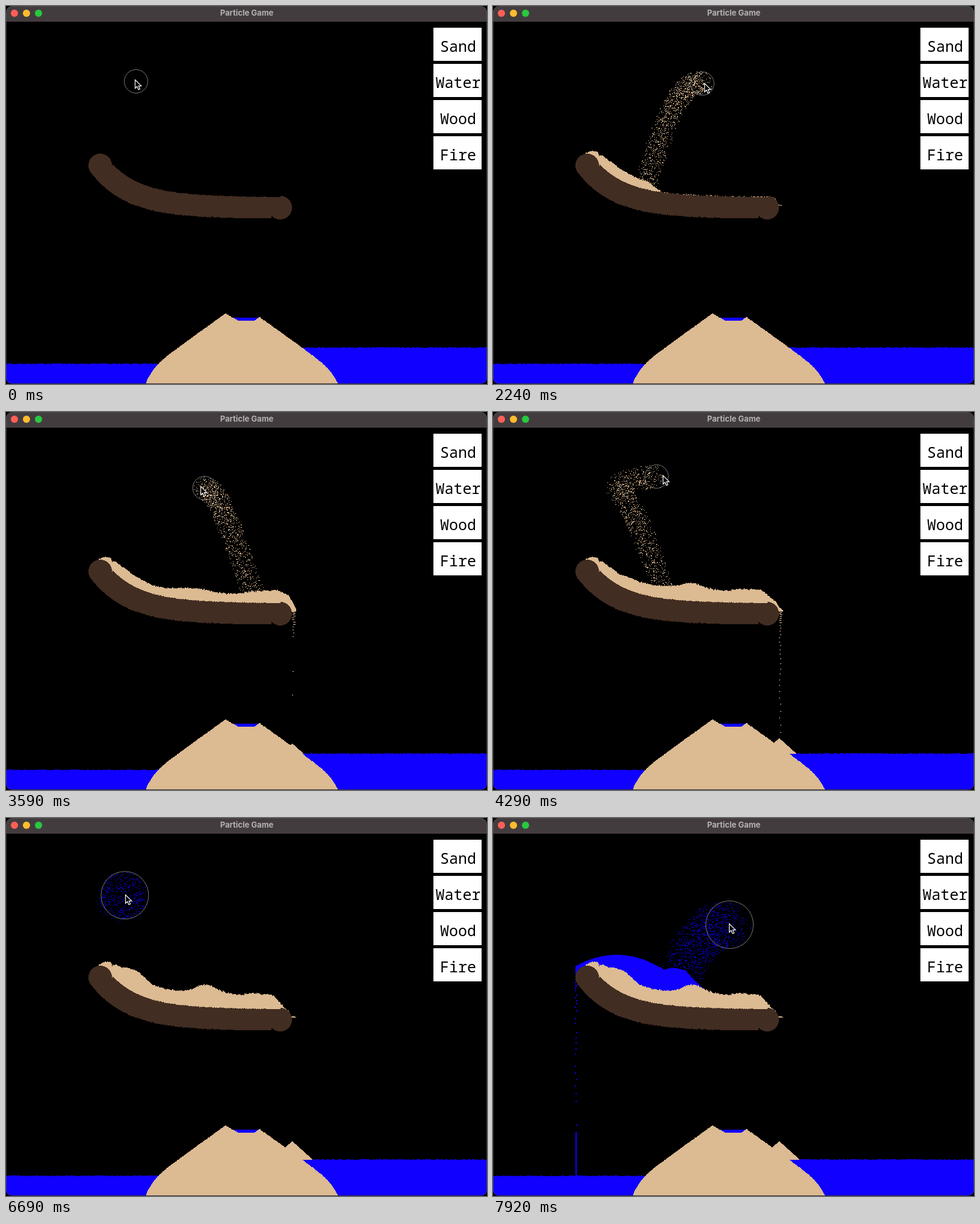
Recreate the animation shown at these times as an HTML page with a canvas. Size 799x627 px, loop 8 s.

```html
<!DOCTYPE html>
<html lang="en">
<head>
<meta charset="utf-8">
<title>Particle Game</title>
<style>
  html, body { margin: 0; width: 100%; height: 100%; overflow: hidden; background: #000; }
  svg, canvas { position: absolute; left: 0; top: 0; width: 799px; height: 627px; display: block; border-radius: 10px; }
  .title { font: 700 13px Inter, sans-serif; fill: #b5b1b3; text-anchor: middle; }
  .label { font: 25px "Noto Sans Mono", monospace; text-anchor: middle; }
</style>
</head>
<body>
<svg id="ui" viewBox="0 0 799 627">
  <rect width="799" height="26" fill="#433c3f"/>
  <circle cx="14" cy="12" r="6" fill="#ff5f57"/>
  <circle cx="34" cy="12" r="6" fill="#febc2e"/>
  <circle cx="54" cy="12" r="6" fill="#28c840"/>
  <text class="title" x="400" y="16">Particle Game</text>
</svg>
<canvas id="stage" width="799" height="627"></canvas>
<svg viewBox="0 0 799 627">
  <rect x=".5" y=".5" width="798" height="626" rx="10" fill="none" stroke="#555" stroke-opacity=".6"/>
</svg>
<script>
const SAND = '#dcba92', WATER = '#1000ff', WOOD = '#422d22';
const LOOP = 8000, FRAME = LOOP / 90;
const PHASE = 30;    // each picture shows the scene this far into its frame
const GRAVITY = 750; // half the acceleration, px/s²
const TICK = 16;
const ctx = document.getElementById('stage').getContext('2d');

['Sand', 'Water', 'Wood', 'Fire'].forEach((name, i) => {
  document.getElementById('ui').insertAdjacentHTML('beforeend',
    `<rect x="710" y="${36 + 60 * i}" width="80" height="55" fill="#fff"/>
     <text class="label" x="751" y="${76 + 60 * i}">${name}</text>`);
});

// Turning points of the brush: time, x, y
const brushPath = [
  [30, 216, 125], [980, 168, 75], [1300, 180, 90], [1520, 215, 88], [2420, 378, 138], [2870, 462, 153],
  [3320, 369, 134], [3590, 329, 126], [4150, 205, 107], [4600, 410, 107], [5060, 742, 135],
  [5190, 671, 140], [5210, 363, 175], [6500, 188, 121], [6690, 197, 128], [7200, 226, 140], [7940, 393, 177]
];

const sat = v => Math.min(1, Math.max(0, v));
const clamp = (v, lo, hi) => Math.min(hi, Math.max(lo, v));
const mix = (a, b, k) => a + (b - a) * k;
const arc = (x, cx, r) => Math.sqrt(Math.max(0, r * r - (x - cx) ** 2));
const bump = (x, cx, width) => Math.exp(-(((x - cx) / width) ** 2));

function rand(a, b = 0) {
  let h = Math.imul(a + 1, 0x9e3779b1) ^ Math.imul(b + 7, 0x85ebca6b);
  h = Math.imul(h ^ (h >>> 15), 0x2c1b3c6d);
  h = Math.imul(h ^ (h >>> 12), 0x297a2d39);
  return ((h ^ (h >>> 15)) >>> 0) / 4294967296;
}

function along(path, t, col) {
  if (t <= path[0][0]) return path[0][col];
  const i = path.findIndex(p => p[0] >= t);
  if (i < 0) return path[path.length - 1][col];
  const a = path[i - 1], b = path[i];
  return mix(a[col], b[col], (t - a[0]) / (b[0] - a[0]));
}
const brushX = t => along(brushPath, t, 1);
const brushY = t => along(brushPath, t, 2);
const brushRadius = t => 20 + 20 * sat((t - 5550) / 300);

// The wood is a drooping stroke with a round dab at each end.
function woodTop(x) {
  if (x > 474) return 331;
  if (x < 177) return 264.5 - arc(x, 156, 19.5);
  if (x > 455) return 334.5 - arc(x, 455, 19.5);
  const curve = 314 + (x - 178) / 90 - 50 * Math.exp((178 - x) / 50);
  return curve + (x > 240 && x < 430 ? rand(x, 3) * 1.5 - .5 : 0);
}
function woodBottom(x) {
  if (x < 141) return 264.5 + arc(x, 156, 19.5);
  if (x > 440) return 334.5 + arc(x, 455, 19.5);
  const curve = 353 - 76 * Math.exp((141 - x) / 60);
  return curve + (x > 195 && x < 370 ? rand(x, 4) * 2 - 1 : 0);
}

const rampIn = x => sat((x - 152) / 30);

function firstLayer(x) {
  if (x > 440) return 331 - 36 / 42 * arc(x, 440, 42);
  return woodTop(x) - rampIn(x) * (17 + 3 * Math.cos((x - 195) * .054));
}
function fullLayer(x) {
  if (x > 468) return woodTop(x);
  const depth = 23 + 15 * bump(x, 214, 22) + 14 * bump(x, 332, 25) + 3 * bump(x, 412, 14);
  return Math.max(woodTop(x) - rampIn(x) * depth, 294 + 1.05 * (x - 443));
}

// Sand grows where the stream lands: once to the right, then back over it.
function sandTop(x, t) {
  const base = woodTop(x);
  if (t < 1560 || x < 152 || x > 481) return base;
  const t1 = Math.min(t, 3340);
  const front = brushX(t1 - 430) + 10 + Math.max(0, (t1 - 2870) / 15);
  const left = brushX(clamp(t - 440, 3150, 4150)) - 60;
  const right = brushX(clamp(t - 430, 4150, 4600)) + 100;
  const back = sat((x - left) / 40) * sat((t - 3590) / 500);
  const again = sat((right - x) / 40) * sat((t - 4580) / 200);
  const first = mix(base, firstLayer(x), sat((front - x) / 25));
  const rough = rand(x >> 1, 5) * 2 - 1;
  return Math.min(base, mix(first, fullLayer(x), .6 * back + .4 * again) + rough);
}

function poolTop(x, t) {
  const base = sandTop(x, t);
  if (t < 6870 || x < 137 || x > 350) return base;
  const full = Math.min(227 + .004 * (x - 205) ** 2, 249 + .012 * (x - 300) ** 2);
  const k = sat((brushX(t - 330) + 32 - x) / 30) * sat((t - 6870) / 850);
  return Math.min(base, mix(base, full + rand(x >> 1, 6) - .5, k));
}

const surface = (x, t) => x >= 137 && x <= 481 ? poolTop(x, t) : 566;

// Two peaks with a shallow crater between; the flanks steepen at the foot.
function moundTop(x) {
  const flank = d => .72 * d + 18 * (d / 131) ** 10;
  if (x < 364) return 510 + flank(364 - x);
  if (x > 421) return 516 + flank(x - 421);
  return Math.min(510 + .55 * (x - 364), 516 + .6 * (421 - x), 522);
}

function column(x, top, bottom) {
  const y = Math.round(top), h = Math.round(bottom) - y;
  if (h > 0) ctx.fillRect(x, y, 1, h);
}

function drawGround(t, frame) {
  ctx.fillStyle = WATER;
  ctx.fillRect(375, 517, 45, 10);
  for (let x = 0; x < 799; x++) {
    if (x < 262 || x > 485) column(x, (x < 262 ? 593 : 566) + (rand(x >> 1, frame) < .5), 626);
  }
  ctx.fillStyle = SAND;
  for (let x = 233; x <= 553; x++) column(x, moundTop(x) + rand(x, 8) - .5, 626);
  const peak = 556 - 20 * sat((t - 3300) / 1500) ** .7;
  for (let x = 460; x <= 509; x++) column(x, peak + .9 * Math.abs(x - 475), Math.min(567, moundTop(x) + 2));
  for (let x = 494; x <= 509; x++) column(x, peak + .9 * (x - 475), 567);
}

function drawShelf(t) {
  ctx.fillStyle = WATER;
  for (let x = 137; x <= 350; x++) column(x, poolTop(x, t), sandTop(x, t));
  ctx.fillStyle = SAND;
  for (let x = 152; x <= 481; x++) column(x, sandTop(x, t), woodTop(x));
  ctx.fillStyle = WOOD;
  for (let x = 137; x <= 474; x++) column(x, woodTop(x), woodBottom(x));
}

function eachTick(t, from, to, draw) {
  const first = Math.ceil(Math.max(from, t - 800) / TICK);
  const last = Math.floor(Math.min(to, t) / TICK);
  for (let k = first; k <= last; k++) draw(k, GRAVITY * ((t - k * TICK) / 1000) ** 2);
}

function pour(t, from, to, count, colours) {
  eachTick(t, from, to, (k, fall) => {
    const time = k * TICK, r = brushRadius(time);
    for (let i = 0; i < count; i++) {
      const seed = k * 100 + i, angle = rand(seed, 11) * Math.PI * 2;
      const d = r * Math.sqrt(rand(seed, 12));
      const x = Math.round(brushX(time) + d * Math.cos(angle));
      const y = Math.round(brushY(time) + d * Math.sin(angle) + fall);
      if (y >= surface(x, t)) continue;
      ctx.fillStyle = colours[Math.floor(rand(seed, 13) * colours.length)];
      ctx.fillRect(x, y, rand(seed, 14) < .15 ? 2 : 1, 1);
    }
  });
}

function drip(t) {
  ctx.fillStyle = SAND;
  eachTick(t, 3120, 4500, (k, fall) => {
    const chance = k * TICK < 3330 ? .2 : 1, y = Math.round(328 + fall);
    if (rand(k, 21) < chance && y < 550) ctx.fillRect(475 + Math.floor(rand(k, 22) * 3), y, fall < 25 ? 4 : 2, 1);
  });
  ctx.fillStyle = WATER;
  eachTick(t, 7285, LOOP, (k, fall) => {
    const y = Math.round(268 + fall);
    if (y > 594) return;
    if (k * TICK < 7375) ctx.fillRect(137, y, 2, Math.min(17, 594 - y));
    else if (rand(k, 23) < .75) ctx.fillRect(136 + Math.floor(rand(k, 24) * 3), y, 2, 2);
  });
}

function drawPointer(t) {
  ctx.lineWidth = 1;
  ctx.strokeStyle = '#777';
  ctx.beginPath();
  ctx.arc(brushX(t), brushY(t), brushRadius(t) - .5, 0, Math.PI * 2);
  ctx.stroke();

  // The system cursor runs slightly ahead of the brush ring.
  ctx.save();
  ctx.translate(Math.round(brushX(t + 25) - 1) + .5, Math.round(brushY(t + 25) - 2) + .5);
  const arrow = new Path2D('M0 0V14L3.2 11L5.5 16.3L8 15.2L5.8 10.2H10.2Z');
  ctx.fillStyle = '#000';
  ctx.strokeStyle = '#fff';
  ctx.lineWidth = 1.2;
  ctx.fill(arrow);
  ctx.stroke(arrow);
  ctx.restore();
}

function render(time) {
  const frame = Math.floor(time % LOOP / FRAME);
  const t = frame * FRAME + PHASE;
  ctx.clearRect(0, 0, 799, 627);
  drawGround(t, frame);
  drip(t);
  drawShelf(t);
  pour(t, 1140, 4600, 36, [SAND, SAND, '#f0b878', '#e8d8c4']);
  pour(t, 6550, LOOP, 60, [WATER]);
  drawPointer(t);
}

const origin = performance.now();
function loop() {
  render(performance.now() - origin);
  requestAnimationFrame(loop);
}
loop();
</script>
</body>
</html>
```
